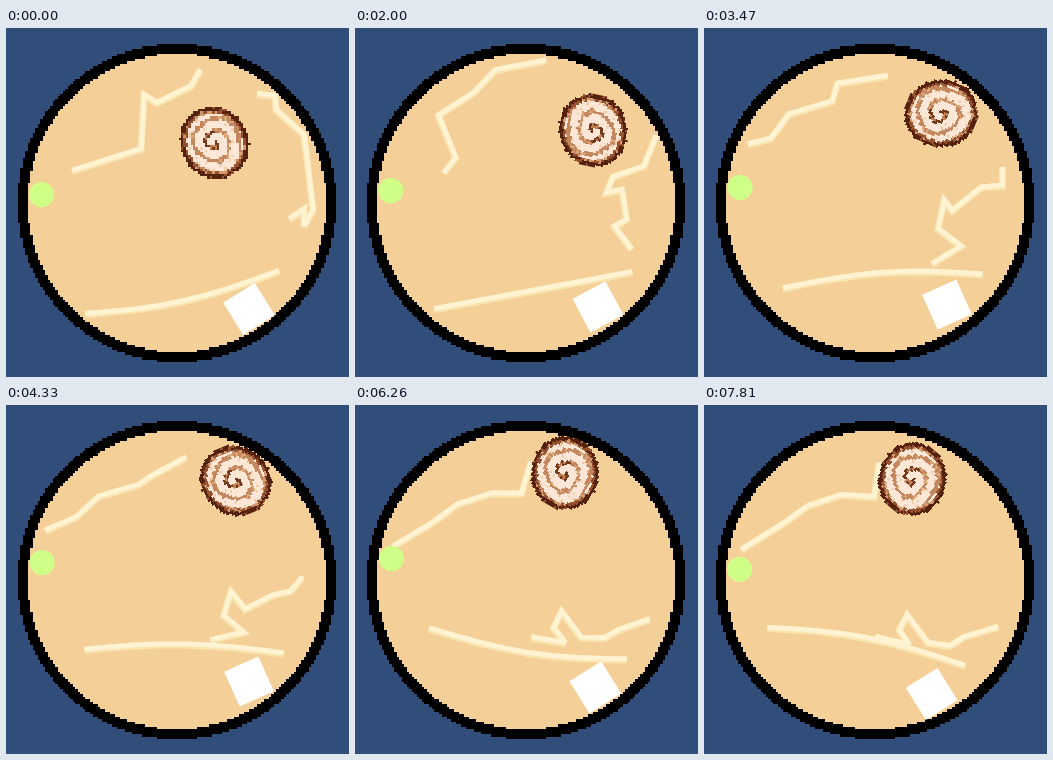
An HTML page with a canvas that plays this animation: 343x349 px, repeating every 7.88 s.

```html
<!DOCTYPE html>
<html lang="en">
<head>
<meta charset="utf-8">
<title>Rolling bun</title>
<style>
html, body { margin: 0; width: 100%; height: 100%; overflow: hidden; background: #314d79; }
canvas { display: block; }
</style>
</head>
<body>
<canvas id="stage" width="343" height="349"></canvas>
<script>
const ctx = document.getElementById('stage').getContext('2d');
const LOOP = 7880;
const STEP = LOOP / 102;
const LAST = LOOP - 70;
const TAU = Math.PI * 2;

const mix = (a, b, u) => a + (b - a) * u;
const clamp = u => Math.min(1, Math.max(0, u));

// Smooth rise from 0 to 1 between two times
function rise(t, from, to) {
  const u = clamp((t - from) / (to - from));
  return u * u * (3 - 2 * u);
}

// The fall is quick at first and then settles
const settle = t => 1 - (1 - clamp(t / LAST)) ** 2.3;

// Corner points of the two hanging ropes while they settle
const topRope = [
  [66,143, 135,121, 138,67, 151,75, 185,58, 194,42],
  [84,157, 107,118, 110,56, 144,43, 180,54, 191,39],
  [89,144, 100,131, 81,90, 116,67, 137,41, 191,32],
  [40,114, 64,109, 85,86, 129,74, 133,57, 183,49],
  [37,145, 80,118, 104,101, 137,90, 170,92, 175,58]
];
const sideRope = [
  [251,66, 269,68, 270,82, 298,107, 307,182, 298,198, 298,181, 283,191],
  [281,81, 275,96, 287,105, 268,152, 286,147, 278,207, 285,217, 272,205],
  [303,110, 290,142, 255,153, 250,166, 265,163, 271,190, 257,197, 277,223],
  [298,142, 299,159, 279,160, 248,184, 238,173, 231,202, 257,220, 224,237],
  [294,222, 260,232, 246,241, 224,238, 203,210, 195,225, 205,240, 171,232]
];

function hangingRope(poses, t) {
  const place = settle(t) * (poses.length - 1);
  const i = Math.min(poses.length - 2, Math.floor(place));
  const flat = poses[i].map((v, k) => mix(v, poses[i + 1][k], place - i));
  return flat.flatMap((v, k) => k % 2 ? [] : [[v, flat[k + 1]]]);
}

// A slack line between two moving ends, swinging faster and faster
function lowRope(t) {
  const k = t / LAST;
  const left = [79 - 16 * k ** 5, 286 - 63 * rise(t, 1000, 6500)];
  const right = [273 + 6 * Math.sin(Math.PI * k) - 12 * k ** 4, 243 + 18 * k * k];
  const sag = 9 * Math.cos(TAU * (k + 0.5 * k ** 4));
  return Array.from({ length: 9 }, (_, i) => {
    const s = i / 8;
    return [mix(left[0], right[0], s), mix(left[1], right[1], s) + sag * Math.sin(Math.PI * s)];
  });
}

function ballAt(t) {
  const lift = 0.0021 * Math.min(t, 6260) - 10.8 * rise(t, 6260, LAST);
  return [35.5 + lift / 14, 166.7 - lift];
}

function boxAt(t) {
  const tilt = rise(t, 800, 3200) - rise(t, 5180, 6080);
  const slide = rise(t, 5700, LAST);
  return [243 - 15.3 * slide, 281 - 4.5 * tilt + 8 * slide, -32 + 8 * tilt];
}

function bunAt(t) {
  return [
    208.5 + 29.5 * (rise(t, 0, 900) - rise(t, 3000, 6800)),
    114.5 - 46.5 * rise(t, 0, 5800) + 6 * rise(t, 6300, LAST),
    400 * settle(t)
  ];
}

// Small pixel picture from a colour rule
function sprite(size, colorAt) {
  const c = document.createElement('canvas');
  c.width = c.height = size;
  const g = c.getContext('2d');
  for (let y = 0; y < size; y++) {
    for (let x = 0; x < size; x++) {
      const color = colorAt(x + 0.5 - size / 2, y + 0.5 - size / 2);
      if (!color) continue;
      g.fillStyle = color;
      g.fillRect(x, y, 1, 1);
    }
  }
  return c;
}

const plate = sprite(128, (x, y) => {
  const r = Math.hypot(x, y);
  return r > 64 ? null : r > 60 ? '#000' : '#f4cf97';
});

let seed = 7;
const rand = () => (seed = seed * 16807 % 2147483647) / 2147483647;

const bun = sprite(30, (x, y) => {
  const a = Math.atan2(y, x);
  const r = Math.hypot(x, y) * (1 + 0.04 * Math.cos(2 * a + 1)) + (rand() - 0.5) * 0.5;
  const n = rand();
  if (r > 14.7) return null;
  if (r > 13) return n < 0.88 ? '#54220e' : '#96512e';
  if (r > 12) return n < 0.7 ? '#96512e' : '#d39c70';
  const turn = r * (1 + 0.06 * Math.cos(3 * a)) / 5.2 - a / TAU + 2;
  if (turn % 1 > 0.34) return n < 0.92 ? '#ffe7d8' : '#f4cfad';
  if (r < 5) return n < 0.7 ? '#74391d' : '#c28155';
  return n < 0.75 ? '#c4875e' : '#d9a679';
});

function drawRope(pts) {
  const stroke = (color, width, dx, dy) => {
    ctx.beginPath();
    pts.forEach(([x, y]) => ctx.lineTo(x + dx, y + dy));
    ctx.strokeStyle = color;
    ctx.lineWidth = width;
    ctx.stroke();
  };
  stroke('#f9e5b2', 7, 0, 0.5);
  stroke('#fff3d2', 4.8, 0.3, -0.6);
}

function placed([x, y, deg], paint) {
  ctx.save();
  ctx.translate(x, y);
  ctx.rotate(deg * Math.PI / 180);
  paint();
  ctx.restore();
}

function draw(t) {
  ctx.fillStyle = '#314d79';
  ctx.fillRect(0, 0, 343, 349);
  ctx.imageSmoothingEnabled = false;
  ctx.drawImage(plate, 12, 16, 318, 318);

  ctx.lineJoin = 'miter';
  ctx.miterLimit = 2.5;
  [hangingRope(topRope, t), hangingRope(sideRope, t), lowRope(t)].forEach(drawRope);

  ctx.fillStyle = '#d0ff88';
  ctx.beginPath();
  ctx.arc(...ballAt(t), 12.6, 0, TAU);
  ctx.fill();

  ctx.fillStyle = '#fff';
  placed(boxAt(t), () => ctx.fillRect(-18.7, -19, 37.4, 38));
  placed(bunAt(t), () => ctx.drawImage(bun, -36, -36, 72, 72));
}

const begin = performance.now();
function tick() {
  const t = (performance.now() - begin) % LOOP;
  draw(Math.min(LAST, Math.floor((t + 5) / STEP) * STEP));
  requestAnimationFrame(tick);
}
tick();
</script>
</body>
</html>
```
